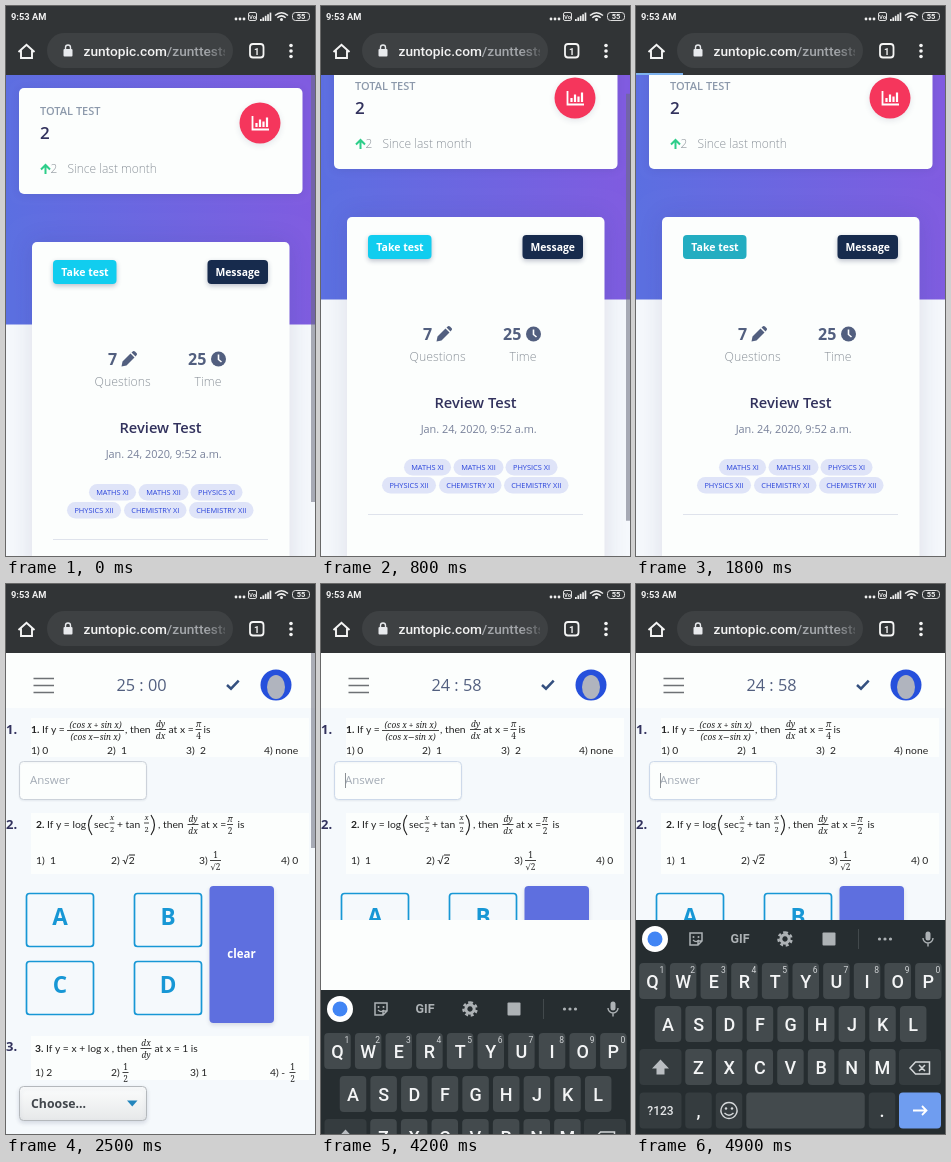
Animation, 309 px wide and 550 px high, one loop 5000 ms. Source, as an HTML page with a canvas:

```html
<!DOCTYPE html>
<html lang="en">
<head>
<meta charset="utf-8">
<title>Online test</title>
<style>
  html, body { margin: 0; width: 309px; height: 550px; overflow: hidden; background: #fff; }
  canvas { display: block; }
</style>
</head>
<body>
<canvas id="stage" width="309" height="550"></canvas>
<script>
const c = document.getElementById('stage').getContext('2d');
const LOOP = 5000, STEP = 100, TOP = 69;
const SANS = '"Open Sans", sans-serif', ROBOTO = 'Roboto, sans-serif';
const NAVY = '#32325d', SLATE = '#525f7f', PAPER = '#fcfefd';
const clamp = v => Math.max(0, Math.min(1, v));
const smooth = p => p * p * (3 - 2 * p);

function text(s, x, y, font, color, align = 'left') {
  c.font = font;
  c.fillStyle = color;
  c.textAlign = align;
  c.fillText(s, x, y);
}
const sans = (s, x, y, size, weight, color, align) =>
  text(s, x, y, `${weight} ${size}px ${SANS}`, color, align);

function box(x, y, w, h, r, fill, stroke, lw = 1) {
  c.beginPath();
  c.roundRect(x, y, w, h, r);
  if (fill) { c.fillStyle = fill; c.fill(); }
  if (stroke) { c.strokeStyle = stroke; c.lineWidth = lw; c.stroke(); }
}
function shadowBox(blur, dy, alpha, ...args) {
  c.save();
  c.shadowColor = `rgba(40,50,90,${alpha})`;
  c.shadowBlur = blur;
  c.shadowOffsetY = dy;
  box(...args);
  c.restore();
}
function disc(x, y, r, color) {
  c.fillStyle = color;
  c.beginPath();
  c.arc(x, y, r, 0, 7);
  c.fill();
}
function shape(d, fill) {
  c.fillStyle = fill;
  c.fill(new Path2D(d));
}
function stroke(d, color, lw = 1) {
  c.strokeStyle = color;
  c.lineWidth = lw;
  c.stroke(new Path2D(d));
}
function dots(x, y, dx, dy, r, color) {
  for (let i = -1; i < 2; i++) disc(x + i * dx, y + i * dy, r, color);
}
function scrollbar(y, h, alpha) {
  c.globalAlpha = alpha;
  box(305, y, 4, h, 0, 'rgba(105,108,125,.55)');
  c.globalAlpha = 1;
}

function browserBar(load) {
  box(0, 0, 309, TOP, 0, '#313436');
  text('9:53 AM', 5, 14, `bold 9.3px ${ROBOTO}`, '#f1f1f1');
  dots(234, 13, 4, 0, 1.4, '#eee');
  box(242.5, 6.5, 8, 8, 1.5, null, '#ddd');
  text('Vo', 246.5, 13, `bold 6px ${ROBOTO}`, '#ddd', 'center');
  for (let i = 0; i < 5; i++) box(254 + i * 2.4, 13 - i * 1.6, 1.7, 2 + i * 1.6, 0, '#eee');
  stroke('M269 9.5Q275.5 4 282 9.5M271.3 11.7Q275.5 8 279.7 11.7', '#eee', 1.5);
  disc(275.5, 13.5, 1.5, '#eee');
  box(286.5, 6.5, 17, 8, 3, null, '#ddd');
  text('55', 295, 13.3, `bold 7.5px ${ROBOTO}`, '#eee', 'center');

  stroke('M12.5 46L20.5 38.7L28.5 46M15 44.500V52H26V44.500', '#f5f5f5', 1.9);
  box(41, 27, 186, 35, 17.5, '#3e4143');
  box(57.5, 43, 9, 7.5, 1, '#e8eaed');
  stroke('M59.5 43V41.5A2.5 2.5 0 0 1 64.5 41.5V43', '#e8eaed', 1.4);
  const url = `500 13.7px ${ROBOTO}`;
  text('zuntopic.com', 77.5, 50, url, '#f3f3f3');
  const start = 77.5 + c.measureText('zuntopic.com').width;
  const fade = c.createLinearGradient(200, 0, 222, 0);
  fade.addColorStop(0, '#a3a6aa');
  fade.addColorStop(1, '#a3a6aa20');
  c.save();
  c.beginPath();
  c.rect(0, 27, 219, 35);
  c.clip();
  text('/zunttests', start, 50, url, fade);
  c.restore();
  box(244, 38, 13.5, 13.5, 3, null, '#f5f5f5', 1.8);
  text('1', 250.7, 48.5, `bold 9.5px ${ROBOTO}`, '#f5f5f5', 'center');
  dots(285, 45, 0, 5.5, 1.8, '#f5f5f5');
  if (load) box(0, 67, load, 2, 0, '#7db2ee');
}

function dashboard(t) {
  const scroll = 25 * smooth(clamp((t - 400) / 400));
  const pressed = t >= 1600;
  box(0, TOP, 309, 481, 0, '#f5f8fc');
  c.save();
  c.translate(0, -scroll);
  const sky = c.createLinearGradient(0, 210, 309, 180);
  sky.addColorStop(0, '#5b6fe1');
  sky.addColorStop(1, '#805be0');
  box(0, 60, 309, 258.5, 0, sky);

  shadowBox(8, 1, .12, 13, 82, 283.5, 106, 5, PAPER);
  sans('TOTAL TEST', 34, 109, 11, 600, '#8c99ab');
  sans('2', 34, 133, 17, 600, NAVY);
  shadowBox(6, 2, .12, 233.5, 96.5, 41, 41, 20.5, '#f5365c');
  stroke('M246.5 110V123.5H263', '#fff', 1.8);
  stroke('M250.5 121V117M254 121V113.5M257.5 121V115.5M261 121V111.5', '#fff', 2.2);
  stroke('M39.5 168V159.5M35 163.5L39.5 159L44 163.5', '#2dce89', 2);
  sans('2', 44.5, 167, 12, 300, '#8d949c');
  sans('Since last month', 61.5, 167, 12, 300, '#8d949c');

  shadowBox(24, 0, .13, 26, 236, 257.5, 400, 5, PAPER);
  shadowBox(pressed ? 0 : 5, pressed ? 0 : 2, .3, 47, 254, 63.5, 24, 4, pressed ? '#23adc1' : '#11cdef');
  sans('Take test', 79, 270, 10.5, 700, '#fff', 'center');
  shadowBox(5, 2, .3, 201.5, 254, 60.5, 24, 4, '#172b4d');
  sans('Message', 231.7, 270, 10.4, 700, '#fff', 'center');

  sans('7', 102, 359, 16, 700, SLATE);
  shape('M115.5 360.5L116.5 355.5L124.5 347.5L128.5 351.5L120.5 359.5ZM125.5 346.5L127 345.2Q128 344.5 129 345.5L130.7 347.2Q131.5 348 130.7 349L129.5 350.5Z', SLATE);
  sans('25', 182, 359, 16, 700, SLATE);
  disc(212.5, 353, 7.5, SLATE);
  stroke('M212.5 348.5V353.5L215.5 356', '#fff', 1.6);
  sans('Questions', 116.7, 380, 12.3, 300, '#8d949c', 'center');
  sans('Time', 202, 380, 12.3, 300, '#8d949c', 'center');
  sans('Review Test', 154.5, 427, 14.7, 600, NAVY, 'center');
  sans('Jan. 24, 2020, 9:52 a.m.', 157.7, 452, 10.9, 400, '#78819a', 'center');

  const pill = (label, x, y, w) => {
    box(x, y, w, 16.5, 8.25, '#dfe4f8');
    sans(label, x + w / 2, y + 11, 7.4, 500, '#2a44db', 'center');
  };
  pill('MATHS XI', 83, 478, 47);
  pill('MATHS XII', 132.5, 478, 50);
  pill('PHYSICS XI', 184.5, 478, 52);
  pill('PHYSICS XII', 61, 496, 54);
  pill('CHEMISTRY XI', 118, 496, 62.5);
  pill('CHEMISTRY XII', 183, 496, 64.5);
  box(47, 533, 215, 1, 0, '#dfe3ec');
  c.restore();
  scrollbar(TOP + scroll * .75, 427, clamp((1400 - t) / 300));
}

function eq(s, x, y, weight = 400) {
  text(s, x, y, `${weight} 10.3px Lato, "DejaVu Sans", sans-serif`, '#222');
  return c.measureText(s).width;
}
function question(n, s, x, y) {
  eq(s, x + eq(n + ' ', x, y, 700), y);
}
function frac(num, den, x, y, w, size = 8.3) {
  const part = (s, dy) => {
    const style = /^[\d√]/.test(s) ? 'normal' : 'italic';
    text(s, x, y + dy, `${style} 500 ${size}px "Noto Serif", "DejaVu Sans", serif`, '#222', 'center');
  };
  part(num, -6.5);
  part(den, 5.5);
  box(x - w / 2, y - 4, w, 1, 0, '#444');
}

function quiz(t) {
  const left = t < 3100 ? '25 : 00' : t < 4100 ? '24 : 59' : '24 : 58';
  const focused = t >= 3900, cursor = focused && (t < 4400 || t >= 4900);
  box(0, TOP, 309, 481, 0, '#f5f9fc');
  box(0, TOP, 309, 55, 0, PAPER);
  box(25, 134, 278, 39, 0, PAPER);
  box(25, 229, 278, 61, 0, PAPER);
  box(25, 452, 278, 44, 0, PAPER);
  stroke('M27.5 94.5H48M27.5 101.5H48M27.5 108.5H48', '#6d7175', 1.5);
  sans(left, 135.5, 107, 16.3, 400, SLATE, 'center');
  stroke('M221 101L225 104.7L232.7 96.7', '#34507f', 2.5);
  disc(270, 101, 15.5, '#2650dc');
  c.fillStyle = '#b0b4be';
  c.beginPath();
  c.ellipse(270, 103, 9, 12, 0, 0, 7);
  c.fill();

  [['1.', 150], ['2.', 245], ['3.', 467]].forEach(([n, y]) => sans(n, 0, y, 13, 700, NAVY));

  question('1.', 'If y =', 25, 149);
  frac('(cos x + sin x)', '(cos x−sin x)', 89.5, 150, 57);
  eq(', then', 119, 149);
  frac('dy', 'dx', 154.5, 149, 11);
  eq('at x =', 162.5, 149);
  frac('π', '4', 192.5, 149, 6);
  eq('is', 197.5, 149);
  eq('1) 0', 25, 170);
  eq('2)  1', 101, 170);
  eq('3)  2', 180, 170);
  eq('4) none', 258, 170);

  shadowBox(2, 1, .06, 13.5, 177.5, 127, 38, 4, PAPER, focused ? '#cdd9ea' : '#ccd2da');
  sans('Answer', 24, 200, 11.5, 400, '#a3abb5');
  if (cursor) box(24, 189, 1, 15, 0, '#8a8f94');

  question('2.', 'If y = log', 30, 244);
  stroke('M86 231Q79 241 86 251M145 231Q152 241 145 251', '#222', 1.2);
  eq('sec', 88, 244);
  frac('x', '2', 106, 242.5, 5, 7.5);
  eq('+ tan', 111, 244);
  frac('x', '2', 140.5, 242.5, 5, 7.5);
  eq(', then', 152, 244);
  frac('dy', 'dx', 187, 244, 11);
  eq('at x =', 195, 244);
  frac('π', '2', 224, 244, 6);
  eq('is', 231.5, 244);
  eq('1)  1', 30, 280);
  eq('2) √2', 105, 280);
  stroke('M123 271H129', '#222');
  eq('3)', 193, 280);
  frac('1', '√2', 209.5, 280, 11);
  eq('4) 0', 275, 280);

  const BLUE = '#1797d5';
  const choice = (s, x, y) => {
    box(x, y, 67, 53, 3, null, BLUE, 1.7);
    sans(s, x + 33.5, y + 31, 22.5, 700, BLUE, 'center');
  };
  choice('A', 20.5, 309.5);
  choice('B', 128.5, 309.5);
  choice('C', 20.5, 377.5);
  choice('D', 128.5, 377.5);
  shadowBox(4, 2, .15, 203.5, 302, 64.5, 137, 4, '#5e6fdf');
  sans('clear', 235.5, 374, 11.5, 700, '#fff', 'center');

  question('3.', 'If y = x + log x , then', 29, 468);
  frac('dx', 'dy', 140, 468, 11);
  eq('at x = 1 is', 148.5, 468);
  eq('1) 2', 29, 492);
  eq('2)', 105, 492);
  frac('1', '2', 119.5, 492, 6);
  eq('3) 1', 184, 492);
  eq('4) -', 264, 492);
  frac('1', '2', 286.5, 492, 6);

  const grey = c.createLinearGradient(0, 502, 0, 537);
  grey.addColorStop(0, '#fcfdfd');
  grey.addColorStop(1, '#e6e8e9');
  shadowBox(4, 2, .15, 13.5, 502.5, 127, 34, 4, grey, '#b4b8bc');
  sans('Choose...', 25, 524, 12.3, 700, '#41464c');
  shape('M121 516.5H131.5L126.25 522.5Z', '#2385bd');

  if (t >= 4100) {
    box(0, 336, 309, 214, 0, PAPER);
    keyboard(Math.round(214 * Math.pow(1 - clamp((t - 4050) / 400), 2.38)));
  } else scrollbar(TOP, 195, clamp((3200 - t) / 300));
}

function keyboard(drop) {
  const KEY = '#434a4d', SIDE = '#353c3f', ICON = '#adb2b5', PITCH = 30.65;
  c.save();
  c.translate(0, drop);
  box(0, 336, 309, 214, 0, '#262d30');
  disc(19, 355, 13, '#fff');
  disc(19, 355, 7.5, '#4285f4');
  stroke('M54 349H66V357L62 361H54ZM66 357H62V361', ICON, 1.5);
  disc(57.5, 353, 1, ICON);
  disc(62.5, 353, 1, ICON);
  stroke('M57 356Q60 359 63 356', ICON, 1.2);
  text('GIF', 104, 359, `bold 12.5px ${ROBOTO}`, ICON, 'center');
  c.setLineDash([3, 2.5]);
  stroke('M149 348.5A6.5 6.5 0 1 1 148.99 348.5', ICON, 2.5);
  c.setLineDash([]);
  stroke('M149 350.8A4.2 4.2 0 1 1 148.99 350.8', ICON, 3);
  box(186.5, 348.5, 13, 13, 1, ICON);
  box(222, 345, 1, 20, 0, '#42494c');
  dots(249, 355, 5.5, 0, 1.6, ICON);
  box(289.5, 347.5, 5, 9, 2.5, ICON);
  stroke('M287 354A5 5 0 0 0 297 354M292 359V362.5', ICON, 1.4);

  const key = (x, y, w, color) => box(x - w / 2, y - 18, w, 36, 4, color);
  ['QWERTYUIOP', 'ASDFGHJKL', 'ZXCVBNM'].forEach((letters, row) => {
    const y = 397 + row * 43;
    [...letters].forEach((letter, i) => {
      const x = [16.5, 32, 62.5][row] + i * PITCH;
      key(x, y, 26.5, KEY);
      text(letter, x, y + 6.5, `500 18px ${ROBOTO}`, '#f4f5f6', 'center');
      if (!row) text((i + 1) % 10, x + 9.5, y - 8, `8.5px ${ROBOTO}`, '#d3d6d8', 'center');
    });
  });
  key(24.5, 483, 42, SIDE);
  shape('M24.5 475.5L33 484.5H28.5V490.5H20.5V484.5H16Z', '#b9bdc1');
  key(284, 483, 42, SIDE);
  stroke('M274 484L279.5 478H293.5V490H279.5ZM283 481L289 487M289 481L283 487', '#d5d8da', 1.5);

  key(24.5, 526.5, 42, SIDE);
  text('?123', 24.5, 531, `500 12px ${ROBOTO}`, '#e4e6e8', 'center');
  key(62.5, 526.5, 26.5, SIDE);
  text(',', 62.5, 533, `500 18px ${ROBOTO}`, '#f4f5f6', 'center');
  key(93, 526.5, 26.5, SIDE);
  stroke('M93 518.5A8 8 0 1 1 92.99 518.5M88.5 529Q93 533.5 97.5 529', '#d5d8da', 1.4);
  disc(90, 524.5, 1.2, '#d5d8da');
  disc(96, 524.5, 1.2, '#d5d8da');
  key(169.5, 526.5, 118.5, KEY);
  key(246, 526.5, 26.5, SIDE);
  text('.', 246, 533, `500 18px ${ROBOTO}`, '#f4f5f6', 'center');
  key(284, 526.5, 42, '#6f9df0');
  stroke('M277 526.5H290.5M286 522L290.5 526.5L286 531', '#fff', 1.8);
  c.restore();
}

function draw(now) {
  const t = Math.floor(now % LOOP / STEP) * STEP;
  const loading = t >= 1700 && t < 2300;
  (t < 2300 ? dashboard : quiz)(t);
  browserBar(loading ? Math.max(15, 47 + (t - 1800) * .655) : 0);
  requestAnimationFrame(draw);
}
requestAnimationFrame(draw);
</script>
</body>
</html>
```
